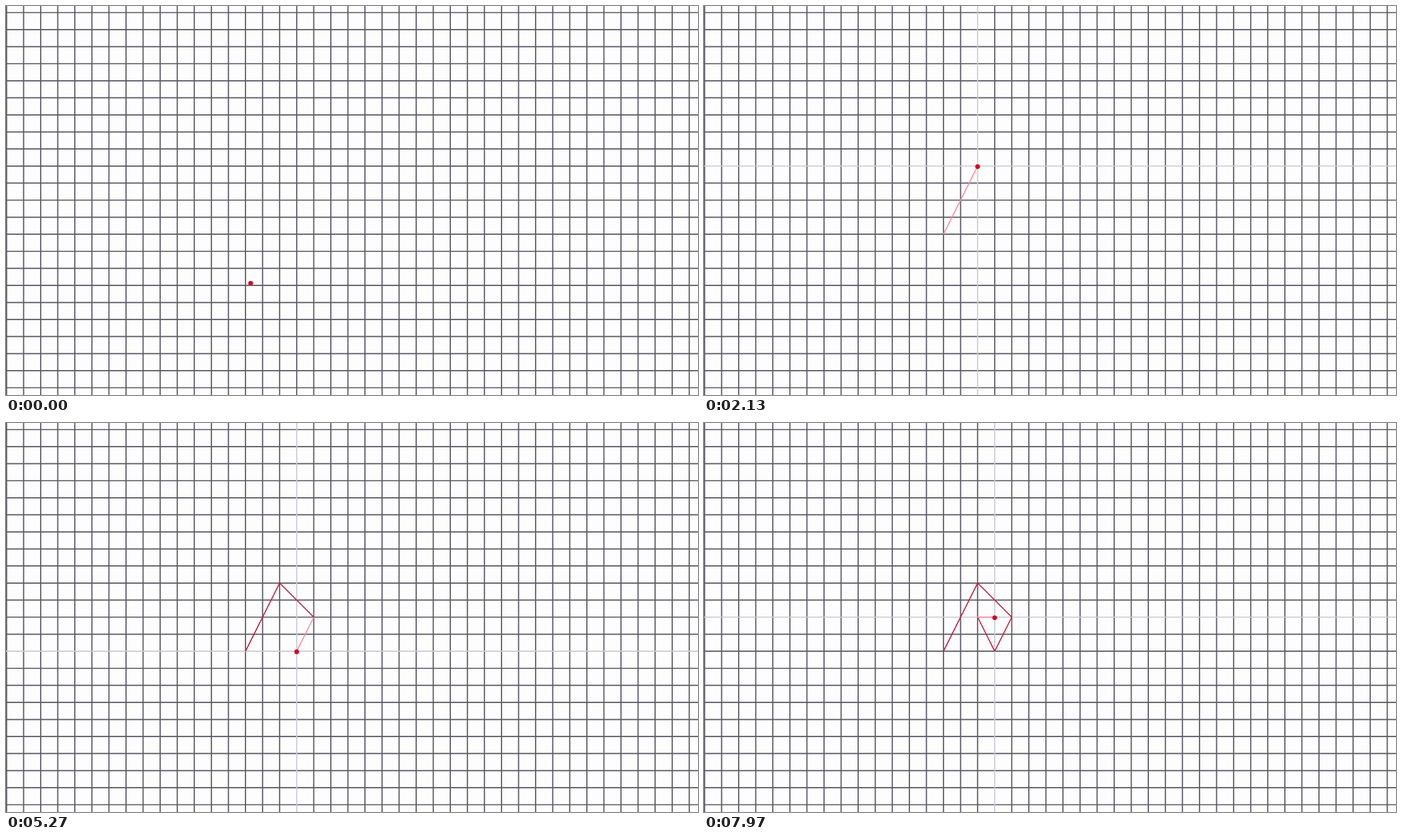
Animation of 997x561 px, one loop 8000 ms. Source, as an HTML page with a canvas:

```html
<!DOCTYPE html>
<html lang="en">
<head>
<meta charset="utf-8">
<title>Snapping line tool</title>
<style>
  html, body { margin: 0; width: 100%; height: 100%; overflow: hidden; background: #fdfdfd; }
  canvas { display: block; }
</style>
</head>
<body>
<canvas id="stage" width="997" height="561"></canvas>
<script>
const W = 997, H = 561, LOOP = 8000;
const PITCH = 24.59, X0 = 0.8, Y0 = 9.5, SNAP = 2.85;
const PAPER = '#fdfdfd', GRID = '#5a5a66', GUIDE = '#cbcbd6';
const RED = '#d20523', LINE = '#c0183f', HOVER = '#f98ca0';
const HOLD = 200; // pause between arriving and letting go
const ctx = document.getElementById('stage').getContext('2d');

const node = (col, row) => ({ x: X0 + col * PITCH, y: Y0 + row * PITCH });

// Each stroke starts where the last one ended; bend is a point passed on the way
const start = node(14, 13);
const strokes = [
  { press: 950, arrive: 1850, to: node(16, 9), bend: { t: 1530, x: 404, y: 239.5 } },
  { press: 2350, arrive: 3300, to: node(18, 11), bend: { t: 2900, x: 429.5, y: 278 } },
  { press: 4250, arrive: 4850, to: node(17, 13) },
  { press: 5500, arrive: 6300, to: node(16, 11) },
  { press: 6900, arrive: 7500, to: node(17, 11) }
];

function buildPath() {
  const keys = [{ t: 0, x: 352.5, y: 399.8 }];
  const stop = (t, p) => keys.push({ t, x: p.x, y: p.y + 0.8 });
  let from = start;
  stop(700, from);
  for (const s of strokes) {
    s.from = from;
    stop(s.press, from);
    if (s.bend) keys.push(s.bend);
    stop(s.arrive, s.to);
    from = s.to;
  }
  stop(LOOP, from);
  return keys;
}

const path = buildPath();
const ease = u => u * u * (3 - 2 * u);

function pointerAt(t) {
  const i = path.findIndex(k => k.t > t);
  const a = path[i - 1], b = path[i];
  const u = ease((t - a.t) / (b.t - a.t));
  return { x: a.x + (b.x - a.x) * u, y: a.y + (b.y - a.y) * u };
}

function line(a, b, color, width = 1.5) {
  ctx.strokeStyle = color;
  ctx.lineWidth = width;
  ctx.beginPath();
  ctx.moveTo(a.x, a.y);
  ctx.lineTo(b.x, b.y);
  ctx.stroke();
}

function dot(p) {
  ctx.fillStyle = RED;
  ctx.beginPath();
  ctx.arc(p.x, p.y, 3.4, 0, Math.PI * 2);
  ctx.fill();
}

function drawGrid(p) {
  const guides = [];
  const rule = (a, b, gap) => {
    if (Math.abs(gap) < SNAP) guides.push([a, b]);
    else line(a, b, GRID, 1.7);
  };
  for (let x = X0; x < W; x += PITCH) rule({ x, y: 0 }, { x, y: H }, p.x - x);
  for (let y = Y0; y < H; y += PITCH) rule({ x: 0, y }, { x: W, y }, p.y - y);
  for (const [a, b] of guides) line(a, b, GUIDE, 1.6);
}

function draw(t) {
  const pointer = pointerAt(t);
  ctx.fillStyle = PAPER;
  ctx.fillRect(0, 0, W, H);
  drawGrid(pointer);

  const begun = strokes.filter(s => t >= s.press);
  begun.forEach((s, i) => {
    if (t < s.arrive + HOLD) {
      line(s.from, pointer, LINE);
      dot(s.from);
    } else {
      const hovered = i === begun.length - 1;
      line(s.from, s.to, hovered ? HOVER : LINE);
    }
  });
  dot(pointer);
}

function tick() {
  draw(performance.now() % LOOP);
  requestAnimationFrame(tick);
}
tick();
</script>
</body>
</html>
```
